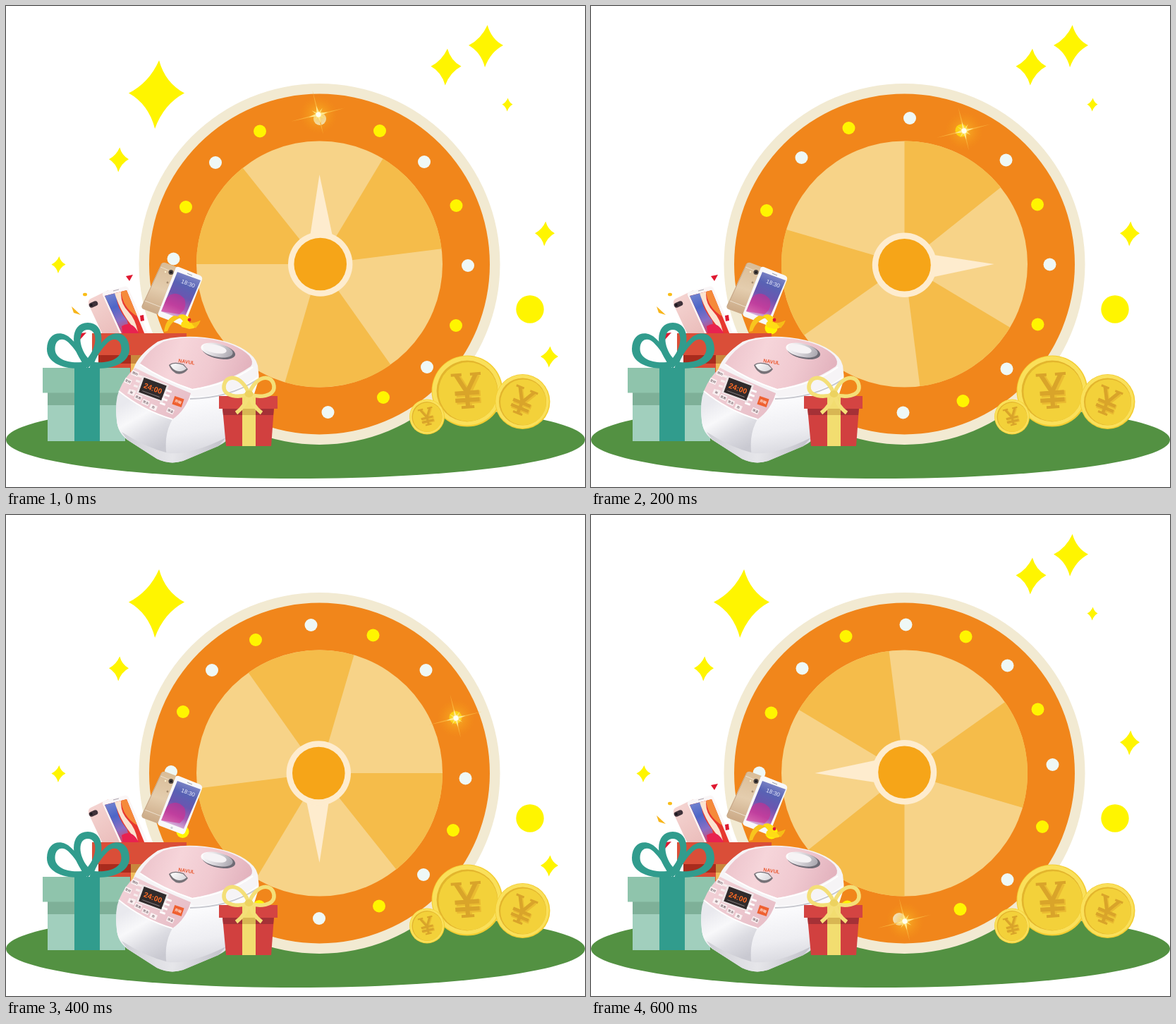
These frames come from a looping animation (821 by 682 pixels, 0.8 s). An HTML page with a canvas:

```html
<!DOCTYPE html>
<html lang="zh">
<head>
<meta charset="utf-8">
<title>Prize wheel</title>
<style>
html, body { margin: 0; width: 100%; height: 100%; overflow: hidden; background: #fff; }
canvas { display: block; }
</style>
</head>
<body>
<canvas id="stage" width="821" height="682"></canvas>
<script>
const ctx = document.getElementById('stage').getContext('2d');
const STEP = 200, TAU = Math.PI * 2, RAD = Math.PI / 180;
const CX = 444.5, CY = 366;
const YELLOW = '#fff500', WHITE = '#eff8f6';

const fill = (d, color) => { ctx.fillStyle = color; ctx.fill(new Path2D(d), 'evenodd'); };
const stroke = (d, color, w) => {
  ctx.strokeStyle = color;
  ctx.lineWidth = w;
  ctx.stroke(new Path2D(d));
};
const rect = (x, y, w, h, color) => { ctx.fillStyle = color; ctx.fillRect(x, y, w, h); };
const oval = (x, y, rx, ry, color, tilt = 0) => {
  ctx.fillStyle = color;
  ctx.beginPath();
  ctx.ellipse(x, y, rx, ry, tilt * RAD, 0, TAU);
  ctx.fill();
};
const disc = (x, y, r, color) => oval(x, y, r, r, color);
const at = (x, y, deg, draw) => {
  ctx.save();
  ctx.translate(x, y);
  ctx.rotate(deg * RAD);
  draw();
  ctx.restore();
};
// Draws twice, mirrored about a vertical axis
const mirror = (x, draw) => {
  for (const side of [1, -1]) {
    ctx.save();
    ctx.translate(x, 0);
    ctx.scale(side, 1);
    draw();
    ctx.restore();
  }
};
const blend = (x0, y0, x1, y1, ...colors) => {
  const g = ctx.createLinearGradient(x0, y0, x1, y1);
  colors.forEach((c, i) => g.addColorStop(i / (colors.length - 1), c));
  return g;
};
const LATIN = '"Liberation Sans", sans-serif', HAN = '"Noto Sans CJK SC", sans-serif';
const label = (text, size, color, font = LATIN, weight = 'bold') => {
  ctx.font = `${weight} ${size}px ${font}`;
  ctx.textAlign = 'center';
  ctx.textBaseline = 'middle';
  ctx.fillStyle = color;
  ctx.fillText(text, 0, 0);
};

// Twinkling stars: x, y, half width, half height
const leftStars = [[213.5, 125.5, 39.5, 48.5], [160, 218, 14, 17.5], [74.5, 367, 10, 12]];
const topStars = [[680.5, 57, 24.5, 30], [624, 86.5, 21.5, 26], [711, 140, 7.5, 9.5]];
const upperRight = [764, 323, 14, 17.5], lowerRight = [770.5, 497.5, 12.5, 15];

function star([x, y, w, h]) {
  ctx.save();
  ctx.translate(x, y);
  ctx.scale(w, h);
  fill('M.09-1Q.31-.34 1-.04Q.26.28-.06 1Q-.29.28-1-.04Q-.27-.34.09-1Z', YELLOW);
  ctx.restore();
}

function stars(step) {
  if (step !== 1) leftStars.forEach(star);
  if (step !== 2) [...topStars, upperRight].forEach(star);
  if (step % 2 === 0) star(lowerRight);
  disc(743, 430, 19.7, YELLOW);
}

// Bulbs relative to the wheel centre, alternately white and yellow
const bulbs = [
  [.5, -206], [85.5, -189], [148.5, -145], [194, -83], [210.5, 2], [193.5, 87], [152.5, 146], [90.5, 189],
  [12, 210], [-76, 195.5], [-151, 146], [-193, 79], [-207, -7.5], [-189.5, -81], [-147.5, -144], [-84.5, -188.5]
];
const wedges = [[-59, -7.2], [54.7, 106.3], [180, 231.4]];

function wheel(step) {
  disc(CX, CY, 256, '#f2ead2');
  at(CX, CY, step * 90, () => {
    disc(0, 0, 241.5, '#f1861b');
    disc(0, 0, 174.5, '#f7d388');
    for (const [a, b] of wedges) {
      ctx.fillStyle = '#f5bc4a';
      ctx.beginPath();
      ctx.moveTo(0, 0);
      ctx.arc(0, 0, 174.5, a * RAD, b * RAD);
      ctx.fill();
    }
    bulbs.forEach(([x, y], i) => disc(x, y, 9, i % 2 ? YELLOW : WHITE));
    fill('M0-127L18-42H-13Z', '#feecce');
    disc(1.2, 0, 45.7, '#feecce');
    disc(1.2, 0, 37.3, '#f6a518');
  });
}

const glints = [[443, 154], [529, 177], [638, 288], [445, 576]];

function glint([x, y]) {
  at(x, y, -14, () => {
    const g = ctx.createRadialGradient(0, 0, 0, 0, 0, 27);
    g.addColorStop(0, 'rgba(255,225,100,.95)');
    g.addColorStop(.3, 'rgba(250,180,35,.55)');
    g.addColorStop(1, 'rgba(245,150,20,0)');
    disc(0, 0, 27, g);
    fill('M-40 0L0-1.3L38 0L0 1.3Z', '#f9b03a');
    fill('M0-35L1.3 0L0 29L-1.3 0Z', '#f9b03a');
    fill('M0-13L2 -2L14 0L2 2L0 13L-2 2L-14 0L-2-2Z', '#ffe98d');
    at(0, 0, 45, () => fill('M0-11L1.5 0L0 11L-1.5 0ZM-11 0L0-1.5L11 0L0 1.5Z', '#ffe377'));
    disc(0, 0, 3.6, '#fffef0');
  });
}

function coin(x, y, r, tilt) {
  disc(x, y, r, '#f3cd32');
  disc(x - r * .01, y - r * .01, r * .97, '#fae05a');
  disc(x, y, r * .86, '#e3b52d');
  disc(x + r * .025, y + r * .02, r * .83, '#f3d13a');
  at(x, y, tilt, () => {
    ctx.scale(r / 50, r / 50);
    const yen = 'M-14-23L0 2L14-23M0 2V23M-17 3H17M-17 13H17';
    const serifs = 'M-21-23H-6M6-23H21M-9 23H9';
    ctx.translate(1.5, 1);
    stroke(yen, '#eabb31', 8);
    ctx.translate(-2, -1.5);
    stroke(yen, '#d9a42a', 6);
    stroke(serifs, '#d9a42a', 4);
  });
}

function phones() {
  // rose phone
  fill('M120 415L145 403L176 466H137L117 423Q116 417 120 415Z', blend(120, 410, 160, 465, '#f5d5d2', '#eabcba'));
  at(124, 423, -23, () => {
    ctx.beginPath();
    ctx.roundRect(-6.5, -3.5, 13, 7, 3.5);
    ctx.fillStyle = '#40323a';
    ctx.fill();
  });
  disc(121, 424, 1.7, '#16161c');
  fill('M140 405L169 397.5Q172 397 173.5 400L202 466H162L137 410Q136 406 140 405Z', '#faf6f7');
  ctx.save();
  ctx.clip(new Path2D('M140 411L171 403L197 466H165Z'));
  rect(135, 400, 70, 70, '#e8382f');
  fill('M138 408L157 403Q154 425 172 446L176 468H165Z', blend(146, 408, 170, 464, '#7383cf', '#4d66c7', '#8a6ec4', '#d9435f'));
  fill('M153 404L164 402Q160 420 174 434Q183 443 187 462Q164 441 153 404Z', '#fbe3d0');
  fill('M163 402L173 403L186 440Q164 427 163 402Z', '#f58a3a');
  fill('M164 454Q180 444 190 468H166Z', '#e82250');
  ctx.restore();
  stroke('M152 404L160 402', '#aaa4ae', 1);

  // gold phone
  fill('M226 364L250 373L217 438L195 430Q191 428 193 424L220 366Q222 363 226 364Z', blend(225, 365, 205, 436, '#d9bd98', '#e4cdae', '#c9a784'));
  stroke('M219 370L243 380M197 418L220 427', '#eee0cd', 1);
  stroke('M193 426L221 365', '#c5a688', 1);
  disc(234, 377.5, 3.5, '#4c443f');
  disc(234, 377.5, 1.5, '#18171b');
  disc(226, 377, 1.2, '#fff2cf');
  disc(229, 392, 1.5, '#a88d70');
  fill('M245 370L275 382Q279 384 278 388L254 450Q252 454 248 452L219 441Q214 439 216 435L240 373Q241 369 245 370Z', '#f8f8fa');
  fill('M243 377L276 389L252 445L220 433Z', blend(262, 382, 235, 441, '#7d86c6', '#5862b4', '#6a56b0', '#a75bb4', '#ddb8dc'));
  fill('M228 414Q240 401 253 415Q258 428 246 437L220 433Z', 'rgba(214,40,140,.55)');
  stroke('M257 379L264 382', '#999ba5', 1);
  disc(235, 443.5, 1.7, '#d0d2d8');
  at(258, 394, 21, () => label('18:30', 8, '#edf0ff', LATIN, 'normal'));
}

function confetti() {
  fill('M170 383L180 381L175 390Z', '#df1830');
  fill('M190 439L195 438L196 446L191 447Z', '#df1830');
  fill('M102 470L106 464L114 463L105 473Z', '#df1830');
  fill('M93 426L106 438L96 435Z', '#f7b51a');
  oval(112, 409, 3, 2.3, '#f9bd18');
  fill('M224 462Q226 445 238 439L250 441Q234 446 229 461Z', '#f8c51e');
  fill('M244 439Q252 434 260 443L257 448Q268 452 275 446Q273 457 260 458L249 455Q247 449 251 447Z', '#ffdc16');
  fill('M263 450L276 446L269 457Z', '#f5bd17');
  disc(260, 445, 2.4, '#df1830');
}

function crate() {
  rect(131, 495, 117, 60, '#d94b37');
  rect(131, 495, 117, 12, '#a92b1d');
  rect(177, 495, 30, 60, '#efbd5c');
  rect(177, 495, 30, 12, '#c9873c');
  rect(122, 464, 134, 31, '#da4e38');
}

function tealGift() {
  const teal = '#319c8d';
  rect(59, 548, 110, 69, '#a1cfbd');
  rect(59, 548, 110, 18, '#7eb098');
  rect(52, 513, 124, 35.5, '#8fc4ac');
  rect(97, 513, 36, 104, teal);
  mirror(116.5, () => fill(
    'M-2 513C-30 517-59 508-58.500 486C-58 463-38 458-24 472C-12 483-6 498-2 513Z' +
    'M-9 505C-30 507-47 500-47 486C-47 472-36 469-28 477C-19 486-13 495-9 505Z', teal));
  fill('M116 514C89 488 90 449 116 449C142 449 142 488 116 514Z' +
    'M116 499C102 482 102 459 116 459C130 459 130 482 116 499Z', teal);
}

// Button: x, y, caption
const keys = [[183, 521, '预约'], [173, 532, '定时'], [178, 548, '粥'], [187.5, 555, '蒸煮'], [198, 562, '煲汤'], [209, 569, '热'], [233, 574, '保温']];

function cooker() {
  fill('M181 514L164 546Q154 561 157 587Q158 604 172 615L214 642Q232 651 251 645L301 624Q330 609 346 569L358 531Q361 514 346 499L276 483Z',
    blend(230, 530, 250, 646, '#fff', '#fafafc', '#eeeef2', '#d3d3da'));
  fill('M160 546Q193 573 236 586Q222 610 229 645L214 642L172 615Q158 604 157 587Q154 561 160 546Z',
    blend(165, 565, 205, 635, '#e9e9ee', '#f8f8fa', '#dcdce2', '#c9c9d1'));
  fill('M172 615L214 642Q232 651 251 645L301 624L312 612Q262 637 230 634Q198 626 164 604Z',
    blend(165, 610, 310, 620, '#cfcfd6', '#e6e6ea', '#c2c2ca'));
  fill('M181 514Q187 495 215 476Q241 466 282 470Q331 476 351 498Q360 508 357 525Q322 553 266 554Z', '#f6f4f6');
  fill('M190 507Q203 486 223 476Q251 467 288 472Q327 478 345 496Q352 505 347 511Q312 535 264 543Q222 529 190 507Z',
    blend(195, 480, 335, 535, '#ecc3cb', '#f6d5da', '#f0c9d0', '#e3b3be'));
  stroke('M190 508Q222 530 264 544Q317 536 350 512', '#fff', 2);
  stroke('M261 557Q316 556 356 530', '#c6c7ce', 2);
  fill('M183 513Q220 532 262 549Q255 573 236 586Q193 573 160 546Q168 526 183 513Z', blend(170, 525, 247, 580, '#f1d0d6', '#e8bfc8'));
  stroke('M160 546Q193 573 236 586', '#fff', 2);
  at(208, 543, 20, () => {
    rect(-20, -13, 40, 26, '#efe6e8');
    rect(-17, -11, 34, 22, '#302b2c');
    label('24:00', 10.5, '#ff6b25');
    rect(-13, 7, 26, 1, '#837b7c');
  });
  for (const [x, y, text] of keys) at(x, y, 24, () => {
    rect(-5, -3.5, 10, 7, '#faf1f2');
    label(text, 4, '#806e75', HAN);
  });
  for (let i = 0; i < 4; i++) {
    at(190 - i * 3, 525 + i * 7, 20, () => rect(-3, -1.5, 6, 3, '#f7eeee'));
    at(231 - i * 3, 546 + i * 6, 20, () => rect(-4, -1.5, 8, 3, '#fff'));
  }
  at(244, 561, 19, () => {
    rect(-7, -6, 14, 12, '#ef6030');
    label('开始', 5, '#fff3ed', HAN);
  });
  oval(301.5, 490, 24, 10, '#6f6b75', 12);
  oval(299, 488, 23, 9.5, blend(278, 480, 319, 499, '#fff', '#d8d5da', '#a9a6ae'), 12);
  oval(296, 486, 17, 6, '#f6f3f5', 12);
  fill('M231 509Q238 503 252 508L258 515Q251 524 241 521Q233 516 231 509Z', '#777278');
  fill('M233 509Q239 505 251 509L256 514Q249 520 241 517Q235 514 233 509Z', blend(235, 505, 252, 520, '#fff', '#d8d6da'));
  at(256, 505, 9, () => label('NAVUL', 7, '#e9562c'));
}

function redGift() {
  fill('M307 570H380L376 624H312Z', '#d1403f');
  fill('M307 570H380L379 580H308Z', '#a53136');
  rect(302, 553, 83, 18, '#d44442');
  rect(335, 553, 19, 71, '#f2dd70');
  rect(335, 571, 19, 9, '#d8b653');
  const bow = 'M0 550C-14 556-37 554-35.500 539C-33 521-10 523 0 550C-4 563-9 570-18 577';
  mirror(344.5, () => stroke(bow, '#f4df78', 5.5));
  oval(344.5, 550, 6, 5, '#ecd260');
}

function draw(step) {
  rect(0, 0, 821, 682, '#fff');
  oval(410.5, 615, 410.5, 55, '#539142');
  stars(step);
  wheel(step);
  glint(glints[step]);
  coin(654, 546, 50.5, -4);
  coin(732.5, 561, 39, 22);
  coin(597, 582.5, 25, -13);
  phones();
  if (step !== 2) confetti();
  crate();
  tealGift();
  cooker();
  redGift();
}

const start = performance.now();
function tick() {
  draw(Math.floor((performance.now() - start) / STEP) % 4);
  requestAnimationFrame(tick);
}
tick();
</script>
</body>
</html>
```
